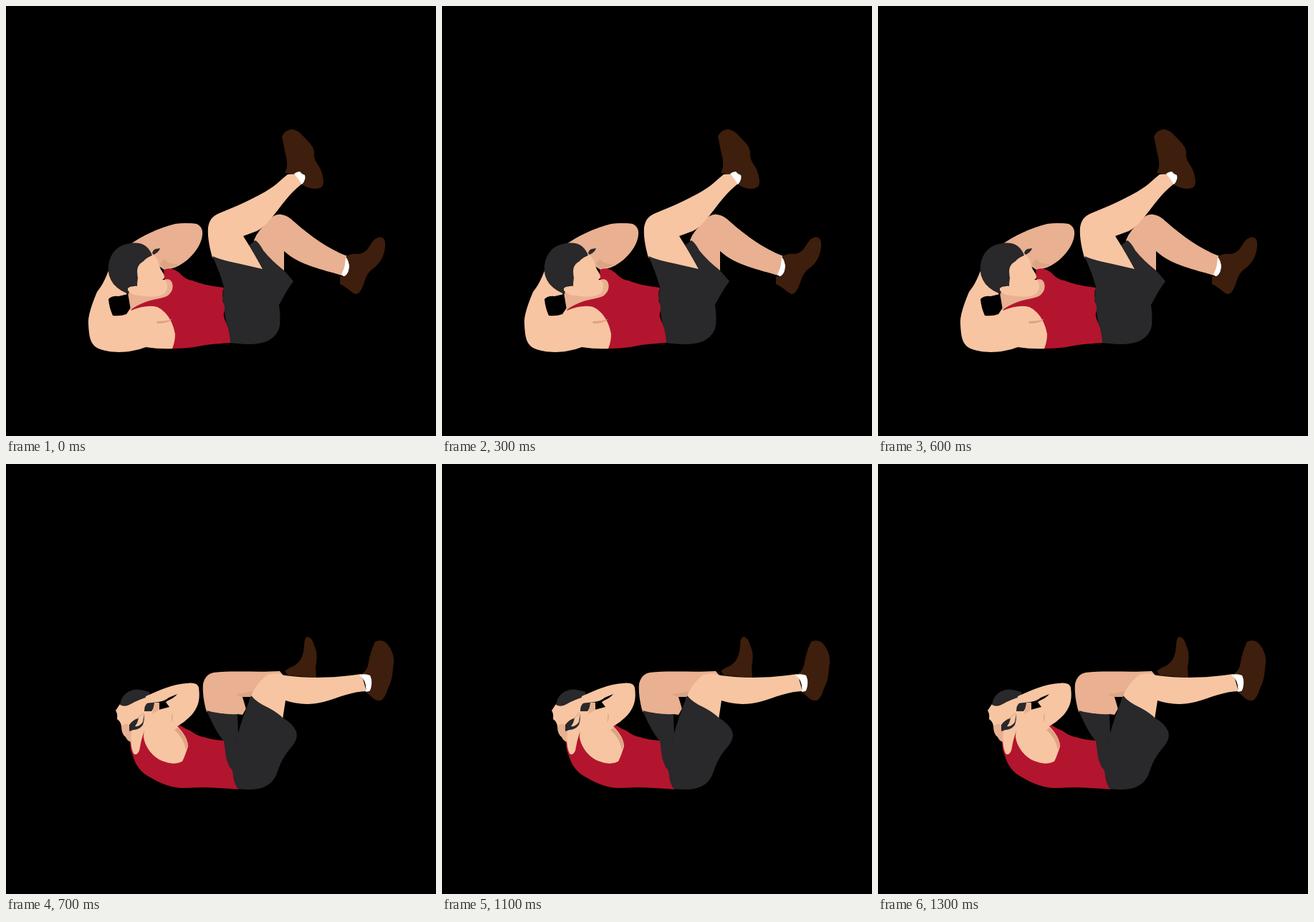
Write an HTML page that moves like this. It is 600 by 600 pixels and loops after 1400 ms.

```html
<!DOCTYPE html>
<html lang="en">
<head>
<meta charset="utf-8">
<title>Crunches</title>
<style>
html, body { margin: 0; width: 100%; height: 100%; overflow: hidden; background: #000; }
svg { display: block; width: 100%; height: 100%; }
.skin { fill: #f7c5a2; }
.far { fill: #e9b091; }
.shade { fill: #dda484; }
.red { fill: #b3152e; }
.dark { fill: #29282a; }
.shoe { fill: #3e1e0c; }
.sock { fill: #fff; }
.gap { fill: #000; }
</style>
</head>
<body>
<svg viewBox="0 0 600 600">
  <g id="down">
    <!-- far arm -->
    <path class="far" d="M174 332C188 322 212 310 236 304Q250 302 266 304Q275 308 274 319C273 333 262 348 248 358Q236 367 221 368L212 362L202 344Z"/>
    <path class="shade" d="M220 353Q227 361 241 360Q231 366 220 366L215 360Z"/>
    <!-- far leg -->
    <path class="far" d="M346 327Q349 319 354 313C365 301 372 289 384 291Q393 292 402 301C426 322 448 338 476 349L469 376C443 368 410 362 388 342L388 371L362 362Z"/>
    <path class="dark" d="M339 334L348 327Q353 330 359 341Q371 356 388 369L401 384Q392 396 380 419L358 380Z"/>
    <path class="sock" d="M474 348Q480 357 479 366Q477 378 471 377L468 375Q474 362 474 348Z"/>
    <path class="shoe" d="M474 350Q482 345 491 346C504 345 506 335 513 327Q519 321 525 323Q530 326 529 336C528 347 523 358 514 365C502 373 502 382 497 393Q493 402 488 402C483 401 477 393 466 388L466 377L473 377Q479 372 479 362Q478 355 474 350Z"/>
    <!-- near leg -->
    <path class="skin" d="M288 351C284 337 281 322 282 309Q284 294 298 289C323 279 362 262 379 247Q388 239 393 235L405 234L413 248C395 262 385 278 372 294Q360 309 350 314L331 321Q345 343 359 369Z"/>
    <path class="shoe" d="M385 182Q390 172 399 172Q408 173 415 182C423 190 430 196 430 205C429 214 434 219 438 226Q443 236 443 247Q442 255 432 255Q422 255 413 249L417 240L409 232L404 235L389 233C395 222 391 211 389 202Q387 191 385 182Z"/>
    <path class="sock" d="M402 234Q406 231 410 231Q413 235 417 236Q419 242 413 249Q408 241 402 234Z"/>
    <path class="dark" d="M288 349Q302 355 323 359L358 367Q370 366 372 369C375 377 373 384 376 392C380 410 384 429 382 446Q380 459 366 467C351 474 331 472 312 470L302 410L304 392Q299 373 288 349Z"/>
    <!-- near arm -->
    <path class="skin" d="M146 362C140 377 136 388 127 399C120 416 114 432 115 444C116 463 118 471 127 477C147 486 174 484 195 476Q214 479 234 478L242 440L205 414L174 421L165 390Z"/>
    <path class="gap" d="M143 409Q148 404 157 405L170 402Q175 409 174 421Q170 427 168 430Q160 433 149 432Q144 421 143 409Z"/>
    <!-- trunk -->
    <path class="red" d="M220 368Q229 364 237 369C246 374 247 381 260 383Q276 390 304 393C301 401 303 407 302 412Q307 419 304 428C302 437 312 444 313 470Q278 472 263 476Q247 478 232 478Q236 468 236 458C234 444 226 427 211 420Q196 416 174 425Q178 415 187 411L223 402Z"/>
    <path class="shade" d="M210 440Q222 440 232 437Q226 443 211 443Z"/>
    <!-- head -->
    <path class="far" d="M170 400L220 382Q230 379 232 387Q235 396 226 404C213 411 198 407 174 424Z"/>
    <path class="skin" d="M182 362L204 346Q213 353 213 360Q215 367 220 374Q223 379 218 382Q224 382 225 389Q226 401 215 404C203 408 187 404 177 402Q169 399 169 393L182 390Z"/>
    <path class="dark" d="M172 402Q159 398 150 388Q141 376 143 362C145 346 154 335 169 332Q185 328 195 335Q201 340 204 348Q196 351 192 356C181 362 183 371 184 379Q183 386 183 391Q176 389 171 393Q168 396 172 402Z"/>
    <path class="dark" d="M204 345Q205 340 209 339L215 338Q213 344 206 347Z"/>
    <path class="skin" d="M170 394Q175 389 180 394L186 404Q174 404 170 394Z"/>
  </g>
  <g id="up">
    <!-- far leg -->
    <path class="shoe" d="M389 289Q395 284 403 281C413 274 415 265 416 254Q416 242 421 241Q427 242 430 253C436 265 433 277 432 284L433 298L394 295Z"/>
    <path class="far" d="M280 346C276 333 274 317 275 307Q278 293 290 291C316 288 352 291 382 289L386 294L358 306L342 326L330 325Q334 333 335 341L329 352Z"/>
    <path class="shade" d="M320 322Q334 319 346 317L341 327L330 325Z"/>
    <path class="dark" d="M280 344Q301 350 324 349L324 378L318 396L304 387Q292 373 280 344Z"/>
    <path class="gap" d="M330 325L342 325L324 379L323 349L331 350L335 342Z"/>
    <!-- near leg -->
    <path class="skin" d="M340 329C345 313 355 301 365 294Q377 290 389 295C426 300 464 298 496 293L503 317C484 317 464 326 443 332C423 337 405 335 390 330L386 356Z"/>
    <path class="shoe" d="M494 294Q503 290 505 281C507 270 510 258 515 248Q523 244 530 249C538 257 542 268 541 278C539 290 540 300 533 313Q529 327 523 330C513 331 512 325 503 319L509 313L510 299L501 295Z"/>
    <path class="sock" d="M493 294Q502 292 508 295Q511 301 510 308Q509 316 507 317L502 318Q504 303 493 294Z"/>
    <!-- trunk -->
    <path class="red" d="M175 378Q172 389 174 398C179 415 184 428 199 436C219 448 235 453 254 452C277 450 299 452 325 454L322 424L304 386Q287 385 276 381C264 379 260 372 252 370L238 362L192 371L190 380Z"/>
    <path class="dark" d="M342 323Q350 333 366 340Q379 347 386 354Q400 362 405 373Q408 382 400 393C390 404 384 414 379 429C374 445 362 453 345 454Q334 455 323 453Q318 445 317 435Q317 427 312 423Q309 415 307 410L304 386L321 388Q326 365 335 342Z"/>
    <!-- head -->
    <path class="skin" d="M159 335L200 322L207 338L193 372Q188 386 186 400Q182 408 178 404Q174 396 174 383L161 366Q160 359 155 356Q156 348 153 344Z"/>
    <path class="far" d="M161 366Q166 360 172 364L175 373L174 388Q169 386 167 381Q161 377 161 366Z"/>
    <path class="dark" d="M159 336Q161 324 169 319Q178 313 188 315L200 318L201 324Q184 329 174 335Q166 340 159 336Z"/>
    <path class="dark" d="M172 364Q177 357 184 355L192 347Q194 356 191 364Q186 371 178 371L172 373Z"/>
    <path class="skin" d="M180 366Q184 361 185 354L193 346L191 360Q186 367 180 366Z"/>
    <path class="dark" d="M193 345Q193 336 198 333L213 332L207 338L204 345Z"/>
    <!-- near arm -->
    <path class="skin" d="M195 324C216 315 233 307 252 306Q267 304 269 312C271 327 269 338 260 349Q250 360 239 366C247 374 254 384 254 394Q250 407 246 415Q235 421 220 415C205 410 194 395 192 381Q192 363 199 351L205 342L209 334L214 332L213 343L228 339L222 331L194 334Z"/>
    <path class="far" d="M207 333L214 332L214 343L204 349Z"/>
    <path class="gap" d="M209 333Q222 331 227 326L239 321Q234 327 226 330L222 333Z"/>
    <path class="shade" d="M235 371L240 368Q251 380 254 391L251 399Q248 382 235 371Z"/>
    <path class="shade" d="M231 347Q235 354 230 361Q232 355 231 347Z"/>
  </g>
</svg>
<script>
const LOOP = 1400;
const down = document.getElementById("down");
const up = document.getElementById("up");

function draw(time) {
  const lifted = time % LOOP >= LOOP / 2;
  down.style.display = lifted ? "none" : "";
  up.style.display = lifted ? "" : "none";
}

function tick() {
  draw(performance.now());
  requestAnimationFrame(tick);
}
tick();
</script>
</body>
</html>
```
